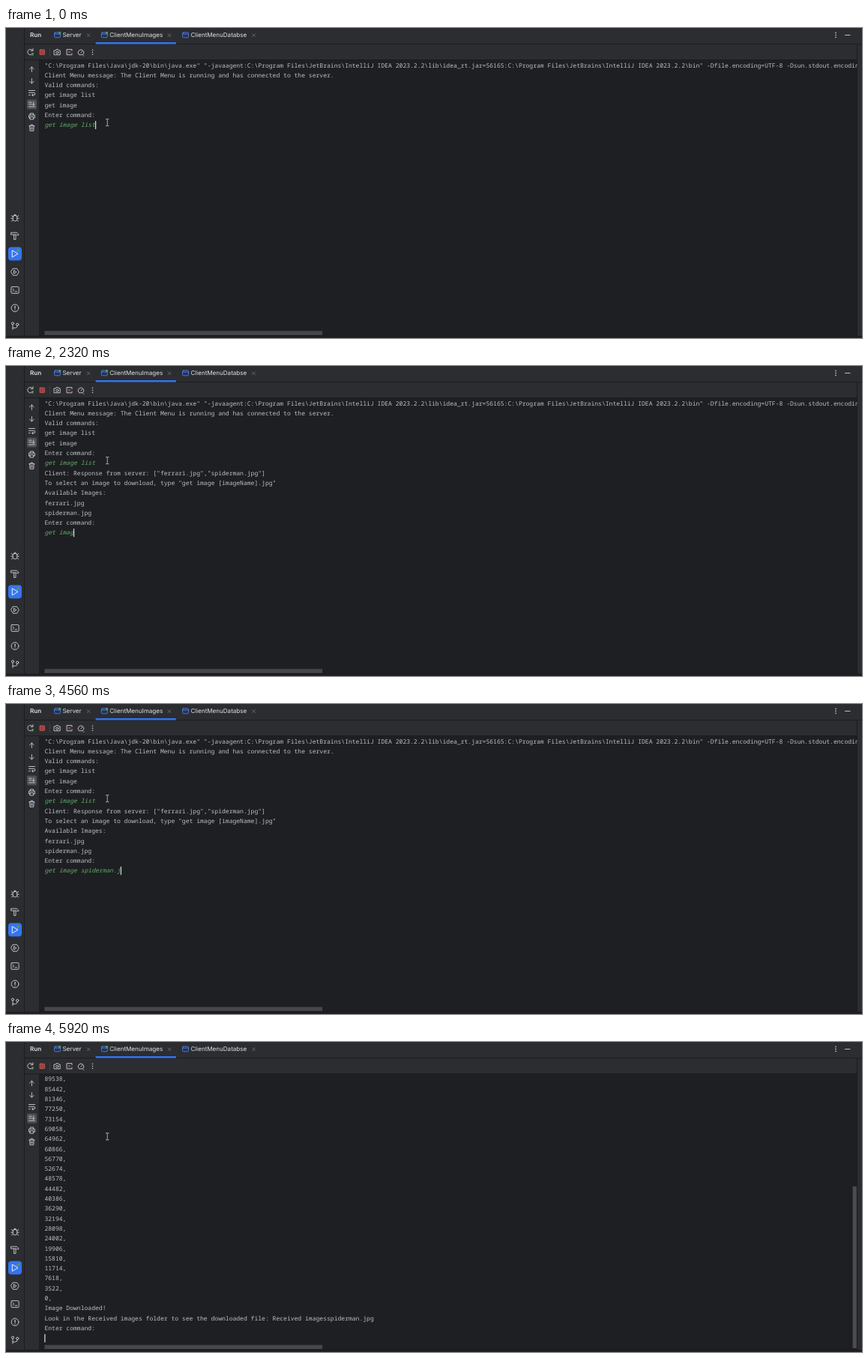
Animation of 1142 by 414 pixels, one loop 6160 ms. Source, as an HTML page:

```html
<!DOCTYPE html>
<html lang="en">
<head>
<meta charset="utf-8">
<title>Run console</title>
<style>
  html, body { margin: 0; width: 100%; height: 100%; overflow: hidden; background: #1e1f22; }
  svg { display: block; }
  text { white-space: pre; text-rendering: geometricPrecision; }
  .ui { font: 8.07px Inter, sans-serif; fill: #dfe1e5; }
  .bold { font-weight: 600; }
  .mono { font: 8.06px "Noto Sans Mono", "DejaVu Sans Mono", monospace; fill: #bcbec4; }
  .input { font-style: italic; fill: #5fad65; }
  .panel { fill: #2b2d30; }
  .edge { fill: #1b1c1f; }
  .icon { fill: none; stroke: #ced0d6; stroke-width: .9; stroke-linecap: round; stroke-linejoin: round; }
  .dim { stroke: #7d8087; stroke-width: .7; }
  .blue { stroke: #548af7; fill: #25324d; stroke-width: .8; }
  .red { stroke: #db5c5c; }
  .dot { fill: #ced0d6; stroke: none; }
  .live { fill: #57965c; stroke: none; }
</style>
</head>
<body>
<svg width="1142" height="414" viewBox="0 0 1142 414">
  <defs>
    <clipPath id="view"><rect x="45" y="43" width="1091" height="368"/></clipPath>
    <g id="tab"><rect x="-4" y="-3.4" width="8" height="6.8" rx="1.2" class="icon blue"/><path d="M-4-1.3H4" class="icon blue"/></g>
    <path id="close" d="M-1.9-1.9L1.9 1.9M1.9-1.9L-1.9 1.9" class="icon dim"/>
    <g id="kebab" class="dot"><circle cy="-3" r=".8"/><circle r=".8"/><circle cy="3" r=".8"/></g>
    <path id="arrow" d="M0 3.2V-3.2M-2.8-.4L0-3.2L2.8-.4" class="icon"/>
  </defs>

  <rect width="1142" height="414" fill="#1e1f22"/>
  <rect class="panel" width="24" height="411"/>
  <rect class="panel" x="25" width="1117" height="21"/>
  <rect class="panel" x="25" y="22" width="1111" height="20"/>
  <rect class="panel" x="25" y="42" width="19" height="369"/>
  <rect class="panel" x="1136" y="22" width="6" height="389"/>
  <rect class="edge" x="24" width="1" height="411"/>
  <rect class="edge" x="25" y="21" width="1111" height="1"/>
  <rect class="edge" x="25" y="42" width="1111" height="1"/>
  <rect class="edge" x="1135" y="22" width="1" height="389"/>
  <rect x="119.5" y="19" width="107.5" height="2.5" rx="1" fill="#3574f0"/>

  <g class="ui">
    <text x="32" y="12.2" class="bold">Run</text>
    <text x="75.4" y="12.2">Server</text>
    <text x="138.2" y="12.2">ClientMenuImages</text>
    <text x="246.4" y="12.2">ClientMenuDatabse</text>
  </g>
  <use href="#tab" x="68.5" y="9.4"/>
  <use href="#tab" x="131.3" y="9.4"/>
  <use href="#tab" x="239.5" y="9.4"/>
  <circle class="live" cx="71.7" cy="6.5" r="1.7"/>
  <circle class="live" cx="134.5" cy="6.5" r="1.7"/>
  <use href="#close" x="110" y="9.7"/>
  <use href="#close" x="218" y="9.7"/>
  <use href="#close" x="330.5" y="9.7"/>
  <use href="#kebab" x="1107" y="9.4"/>
  <path class="icon" d="M1119.5 9.5H1126"/>

  <!-- top toolbar -->
  <g class="icon">
    <path d="M35.6 30A3.7 3.7 0 1 0 36 33.5M36 27.6V30.4H33.2"/>
    <circle class="live" cx="35.2" cy="35" r="1.7"/>
    <rect x="45" y="29" width="6.6" height="6.6" rx=".8" style="fill:#9a4245;stroke:#c75450"/>
    <path d="M58.5 27V37.5" style="stroke:#43454a"/>
    <path d="M64.4 30H66.2L67 28.6H69.6L70.4 30H72.2V35.8H64.4Z"/>
    <circle cx="68.3" cy="32.7" r="1.6"/>
    <path d="M88 30.4V28.6H81V35.8H88V34" />
    <path class="red" d="M83.2 30.9L85.8 33.5M85.8 30.9L83.2 33.5"/>
    <path d="M97.3 35.5A3.8 3.8 0 1 1 102.7 35.5ZM100 33L101.8 30.9"/>
    <path d="M102.6 36.8H104.8L103.7 37.8Z" class="dot"/>
  </g>
  <use href="#kebab" x="115.5" y="32.2"/>

  <!-- console toolbar -->
  <rect x="28" y="95.5" width="13" height="13" rx="2" fill="#4e5157"/>
  <use href="#arrow" x="34.4" y="55.2"/>
  <use href="#arrow" transform="translate(34.4 70.8) scale(1 -1)"/>
  <g class="icon">
    <path d="M30.5 83.5H38.5M30.5 86.4H37.2A1.6 1.6 0 0 1 37.2 89.6H34.8M36 88.2L34.6 89.6L36 91M30.5 89.6H32.2"/>
    <path d="M30.6 99.2H34.2M30.6 101.8H34.2M30.6 105H38.4M36.7 98.8V103.1M35.1 101.6L36.7 103.2L38.3 101.6"/>
    <path d="M32.3 116.2V114H36.6V116.2M32.3 120H30.6V116.2H38.4V120H36.6M32.3 118.6H36.6V122H32.3Z"/>
    <path d="M30.8 130.8H38M33 130.6V129.2H35.8V130.6M31.6 130.8L32 137.4H36.8L37.2 130.8M33.5 132.8V135.4M35.3 132.8V135.4"/>
  </g>

  <!-- side bar -->
  <rect x="3" y="292.5" width="18" height="18" rx="4" fill="#3574f0"/>
  <g class="icon">
    <rect x="9.2" y="250.4" width="5.6" height="7.4" rx="2.6"/>
    <path d="M10.2 250.5A1.9 1.9 0 0 1 13.8 250.5M9 252L7.2 250.5M15 252L16.8 250.5M9 254.2H6.8M15 254.2H17.2M9.3 256.3L7.4 258M14.7 256.3L16.6 258"/>
    <path d="M7 273.2H14.2L16.8 275.4V276.6H14.5L13.4 276H7ZM10.6 276.2V282.4H13V276.2"/>
    <path d="M8.6 297.2L16 301.5L8.6 305.9Z" style="stroke:#fff"/>
    <circle class="live" cx="16.2" cy="297.2" r="1.9"/>
    <path d="M9.4 321.3H14.6L17.3 325.8L14.6 330.3H9.4L6.7 325.8ZM10.7 323.7L14 325.8L10.7 327.9Z"/>
    <rect x="6.9" y="345.6" width="10.2" height="8.8" rx="1.2"/>
    <path d="M9 348.2L10.8 349.9L9 351.6M12 352H14.6"/>
    <circle cx="12" cy="374" r="4.9"/>
    <path d="M12 371.3V374.6M12 376.5V376.6" style="stroke-width:1.2"/>
    <circle cx="9" cy="394.6" r="1.6"/><circle cx="15.2" cy="396" r="1.6"/>
    <path d="M9 396.2V402.8M9 400.6H12.4Q15.2 400.6 15.2 397.6"/>
  </g>

  <g clip-path="url(#view)">
    <g id="lines"></g>
    <rect id="caret" width="1.3" height="11" fill="#ced0d6"/>
  </g>
  <rect x="51.5" y="404.6" width="370.5" height="5.4" fill="#4b4c4f" fill-opacity=".9"/>
  <rect id="thumb" x="1129.6" width="5.2" height="216" fill="#4b4c4f"/>
  <path class="icon" d="M133.4 121.6H134.6L135.2 122.2L135.8 121.6H137M135.2 122.2V130.2M133.4 130.8H134.6L135.2 130.2L135.8 130.8H137" style="stroke-width:.8"/>
  <rect class="edge" y="411" width="1142" height="1"/>
  <rect y="412" width="1142" height="2" fill="#202124"/>
</svg>
<script>
const LOOP = 6160, LEFT = 51.4, TOP = 52.5, ROW = 13.3, CHAR = 4.836;
const BOTTOM = 19 * ROW;
const FOLDER = 'C:\\Program Files\\';
const IDE = FOLDER + 'JetBrains\\IntelliJ IDEA 2023.2.2\\';

const lines = [
  `"${FOLDER}Java\\jdk-20\\bin\\java.exe" "-javaagent:${IDE}lib\\idea_rt.jar=56165:${IDE}bin" -Dfile.encoding=UTF-8 -Dsun.stdout.encoding=UTF-8`,
  'Client Menu message: The Client Menu is running and has connected to the server.',
  'Valid commands:',
  'get image list',
  'get image',
  'Enter command:',
  'get image list',
  'Client: Response from server: ["ferrari.jpg","spiderman.jpg"]',
  'To select an image to download, type "get image [imageName].jpg"',
  'Available Images:',
  'ferrari.jpg',
  'spiderman.jpg',
  'Enter command:',
  'get image spiderman.jpg',
  'Server: Sending...',
  'Server: file size in bytes = 101826',
  'Client: Bytes remaining to be read from socket:'
];
for (let left = 97730; left > 0; left -= 4096) lines.push(left + ',');
lines.push('0,', 'Image Downloaded!',
  'Look in the Received images folder to see the downloaded file: Received imagesspiderman.jpg',
  'Enter command:', '');

// time, caret row, caret column (-1 hides the caret), scroll
const steps = [
  [0, 6, 14], [80, 7, 0], [400, 13, 0], [1200, 13, -1],
  [2000, 13, 5], [2160, 13, 6], [2240, 13, 7], [2320, 13, 8], [2400, 13, 9], [2560, 13, 10],
  [3040, 13, 13], [3200, 13, 14], [3280, 13, 15], [3440, 13, 16], [3520, 13, 17],
  [3680, 13, 18], [3760, 13, 19], [3840, 13, 20], [4560, 13, 21], [5360, 13, 23], [5440, 14, 0],
  [5760, 45, -1, 24.8], [5840, 45, -1, 152], [5920, 45, 0, BOTTOM]
];

const byId = id => document.getElementById(id);
const group = byId('lines'), caret = byId('caret'), thumb = byId('thumb');
const rows = lines.map((line, i) => {
  const el = document.createElementNS('http://www.w3.org/2000/svg', 'text');
  el.setAttribute('class', i === 6 || i === 13 ? 'mono input' : 'mono');
  el.setAttribute('x', LEFT);
  el.setAttribute('y', TOP + i * ROW);
  return group.appendChild(el);
});

function show([, row, col, scroll = 0]) {
  rows.forEach((el, i) => {
    el.textContent = i < row ? lines[i] : i === row ? lines[i].slice(0, Math.max(col, 0)) : '';
  });
  group.setAttribute('transform', `translate(0 ${-scroll})`);
  caret.setAttribute('x', LEFT - .2 + col * CHAR);
  caret.setAttribute('y', TOP + row * ROW - 8.2 - scroll);
  caret.setAttribute('visibility', col < 0 ? 'hidden' : 'visible');
  thumb.setAttribute('y', 43.3 + scroll * .592);
  thumb.setAttribute('visibility', scroll ? 'visible' : 'hidden');
}

let start = null, current = null;
function tick(now) {
  start ??= now;
  const t = (now - start) % LOOP;
  const step = steps.findLast(s => s[0] <= t);
  if (step !== current) show(current = step);
  requestAnimationFrame(tick);
}
show(steps[0]);
requestAnimationFrame(tick);
</script>
</body>
</html>
```
